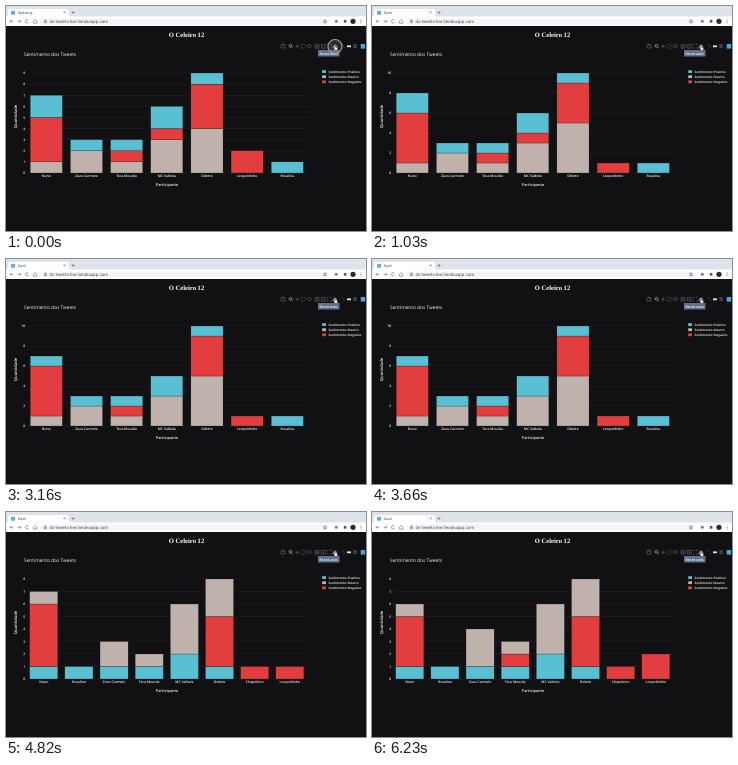
Animation of 360 by 225 pixels, one loop 6.25 s. Source, as an HTML page:

```html
<!DOCTYPE html>
<html lang="pt">
<head>
<meta charset="utf-8">
<title>Dash</title>
<style>
html, body { margin: 0; width: 100%; height: 100%; overflow: hidden; background: #111113; }
svg { display: block; width: 100vw; height: 100vh; }
text { font-family: "Open Sans", "Noto Sans", sans-serif; fill: #f4f4f4; text-rendering: geometricPrecision; }
.small { font-weight: 600; }
.heading { font-family: "Liberation Serif", "Noto Serif", serif; font-weight: bold; fill: #fff; }
.ui { font-family: Roboto, "Liberation Sans", sans-serif; fill: #4a4e53; }
.line { fill: none; stroke: #74787e; stroke-width: .7; }
.mode { fill: none; stroke: #5c5c60; stroke-width: .7; }
#bars { stroke: #111113; stroke-width: .25; }
</style>
</head>
<body>
<svg viewBox="0 0 360 225" preserveAspectRatio="none">
  <filter id="soft" x="-2%" y="-2%" width="104%" height="104%" color-interpolation-filters="sRGB">
    <feGaussianBlur stdDeviation=".35"/>
  </filter>
  <rect width="360" height="225" fill="#111113"/>

  <g id="browser">
    <rect width="360" height="11" fill="#dee2e9"/>
    <path d="M0 11Q2 11 2 9V5Q2 3 4 3H61Q63 3 63 5V9Q63 11 65 11Z" fill="#fff"/>
    <rect y="10.5" width="360" height="9.5" fill="#fff"/>
    <rect x="5" y="4.8" width="4" height="4" rx=".8" fill="#62aee2"/>
    <text id="tab" class="ui" x="12" y="8.1" font-size="3.6"></text>
    <path class="line" d="M57.6 5.4l2 2m0-2l-2 2M65.6 6.5h3m-1.5-1.5v3"/>
    <path class="line" d="M7.4 15.3H4m1.4-1.4l-1.4 1.4 1.4 1.4M11.5 15.3h3.4m-1.4-1.4l1.4 1.4-1.4 1.4M22.4 14.3a1.7 1.7 0 1 0 .2 1.8M27.4 15.3l1.8-1.6 1.8 1.6v1.8h-3.6z"/>
    <rect x="34" y="12.4" width="288" height="6" rx="3" fill="#f3f4f6"/>
    <path class="line" d="M38.4 15.2h2v1.5h-2zM38.7 15v-.5a.7.7 0 0 1 1.4 0v.5"/>
    <text class="ui" x="43.6" y="16.7" font-size="4.4">ds-tweets-live.herokuapp.com</text>
    <path class="line" d="M319 13.6l.5 1.1 1.2.2-.9.9.3 1.2-1.1-.6-1.1.6.3-1.2-.9-.9 1.2-.2z"/>
    <circle cx="330.3" cy="15.3" r="1.5" fill="#5c84b4"/>
    <rect x="337.8" y="13.9" width="2.6" height="2.8" fill="#55595f"/>
    <circle cx="347" cy="15.3" r="2.6" fill="#2b2a30"/>
    <path d="M355 13.4v.9m0 .7v.9m0 .7v.9" stroke="#74787e" stroke-width=".9"/>
  </g>

  <text class="heading" x="180.5" y="31" font-size="6.6" text-anchor="middle">O Celeiro 12</text>
  <text x="18" y="49.6" font-size="4.8">Sentimento dos Tweets</text>
  <text class="small" x="161" y="180.3" font-size="3.8" text-anchor="middle">Participante</text>
  <text class="small" transform="translate(11.2 110.5) rotate(-90)" font-size="4.1" text-anchor="middle">Quantidade</text>
  <g id="legend"></g>
  <g id="axes"></g>
  <g filter="url(#soft)"><g id="bars"></g></g>

  <g class="mode">
    <path d="M275 39h4v3h-4zM276 39v-.8h2v.8"/>
    <g stroke="#b8b8bb"><circle cx="284.5" cy="39.8" r="1.4"/><path d="M285.6 41l1.2 1.2"/></g>
    <path d="M289.2 40.3h4m-2-2v4"/>
    <path d="M295.2 38.4h4v3.8h-4z" stroke-dasharray=".9 .6"/>
    <ellipse cx="303.3" cy="40" rx="2" ry="1.5"/>
    <path d="M309 38.4h4v3.8h-4zM310 40.3h2m-1-1v2M315.3 38.4h4v3.8h-4zM316.3 40.3h2"/>
    <path d="M321.4 39.5v-1.3h1.3m1.4 0h1.3v1.3m0 1.5v1.3h-1.3m-1.4 0h-1.3V41"/>
    <path d="M327 40.2l2-1.8 2 1.8v2h-4z" fill="#a8a8ab"/>
    <path d="M335.4 38.6h1.2m.7 1h.8m0 1v1.5"/>
    <path d="M341 40.3h4" stroke="#e5e5e5" stroke-width="1.8"/>
    <path d="M347.3 39.2h3.5m-3.5 2h3.5" stroke-width="1.2"/>
  </g>
  <rect x="354.7" y="38" width="4.4" height="4.6" fill="#45a6e0"/>

  <path d="M312 44h16l1-1 1 1h3.5v6.5H312z" fill="#60708d"/>
  <text class="small" x="322.7" y="48.6" font-size="3.6" text-anchor="middle">Reset axes</text>
  <circle id="ripple" cx="329" cy="40.5" fill="#909094" fill-opacity=".2" stroke="#a4a4a8" stroke-width="1.1"/>
  <path d="M328.6 39.8q.7-.6 1 .2v1.3l1.7.5q.5.3.2 1.2l-.5 1.3h-2l-1.4-1.8q.2-.6 1 .1z" fill="#fff" stroke="#111" stroke-width=".3"/>
</svg>

<script>
const LOOP = 6250;
const BASE = 167, TOP = 67, LEFT = 20.2, WIDTH = 281.2;
const COLORS = { p: '#59bfd3', n: '#bfb2ad', r: '#e23e40' };
const $ = id => document.getElementById(id);

const SEVEN = ['Nuno', 'Zuzu Carmelo', 'Teca Mourão', 'MC Valbela', 'Odette', 'Leopoldinho', 'Rosalina'];
const GROUPED = [0, 5, 4, 1, 2, 3, 6].map(i => SEVEN[i]);
const EIGHT = [0, 6, 1, 2, 3, 4].map(i => SEVEN[i]).concat('Chapeleiro', 'Leopoldinho');

// Each stack lists its segments from the bottom: count, then sentiment.
const STATES = [
  { from: 0, max: 9, step: 1, names: SEVEN, stacks: '1n4r2p 2n1p 1n1r1p 3n1r2p 4n4r1p 2r 1p' },
  { from: 640, max: 10, step: 2, names: SEVEN, stacks: '1n5r2p 2n1p 1n1r1p 3n1r2p 5n4r1p 1r 1p' },
  { from: 1330, max: 10, step: 2, names: SEVEN, stacks: '1n5r1p 2n1p 1n1r1p 3n2p 5n4r1p 1r 1p' },
  { from: 4060, max: 10, step: 2, names: GROUPED, stacks: '5r1n1p 1r 4r5n1p 2n1p 1n1p 4n2p 1p' },
  { from: 4740, max: 8, step: 1, names: EIGHT, stacks: '1p5r1n 1p 1p2n 1p1n 2p4n 1p4r3n 1r 1r' },
  { from: 5900, max: 8, step: 1, names: EIGHT, stacks: '1p4r1n 1p 1p3n 1p1r1n 2p4n 1p4r3n 1r 2r' }
];

const rect = (x, y, w, h, fill) => `<rect x="${x}" y="${y}" width="${w}" height="${h}" fill="${fill}"/>`;
const label = (x, y, size, text, anchor = 'start') =>
  `<text class="small" x="${x}" y="${y}" font-size="${size}" text-anchor="${anchor}">${text}</text>`;

function drawChart({ max, step, names, stacks }) {
  const unit = (BASE - TOP) / max;
  const slot = WIDTH / names.length;
  let axes = '', bars = '';
  for (let v = 0; v <= max; v += step) {
    const y = BASE - v * unit;
    axes += rect(LEFT, y - .2, WIDTH, .4, '#23262b') + label(19.2, y + 1.3, 3.4, v, 'end');
  }
  stacks.split(' ').forEach((stack, i) => {
    const center = LEFT + slot * (i + .5);
    let y = BASE;
    for (const [, count, kind] of stack.matchAll(/(\d)(\w)/g)) {
      const h = count * unit;
      y -= h;
      bars += rect(center - slot * .4, y, slot * .8, h, COLORS[kind]);
    }
    axes += label(center, 171, 3.4, names[i], 'middle');
  });
  $('axes').innerHTML = axes;
  $('bars').innerHTML = bars;
}

$('legend').innerHTML = [['p', 'Positivo'], ['n', 'Neutro'], ['r', 'Negativo']]
  .map(([kind, name], i) => rect(316.2, 64.2 + i * 5.1, 3.8, 2.8, COLORS[kind]) +
    label(322.6, 66.8 + i * 5.1, 3.15, 'Sentimento=' + name)).join('');

let shown;
function draw(t) {
  const state = STATES.findLast(s => s.from <= t);
  if (state !== shown) {
    drawChart(state);
    shown = state;
  }
  $('tab').textContent = t % 580 < 90 ? 'Updating...' : 'Dash';
  const fade = Math.min(1, t / 240);
  $('ripple').setAttribute('r', 7 + fade);
  $('ripple').setAttribute('opacity', 1 - fade);
}

const start = performance.now();
function tick() {
  draw((performance.now() - start) % LOOP);
  requestAnimationFrame(tick);
}
tick();
</script>
</body>
</html>
```
